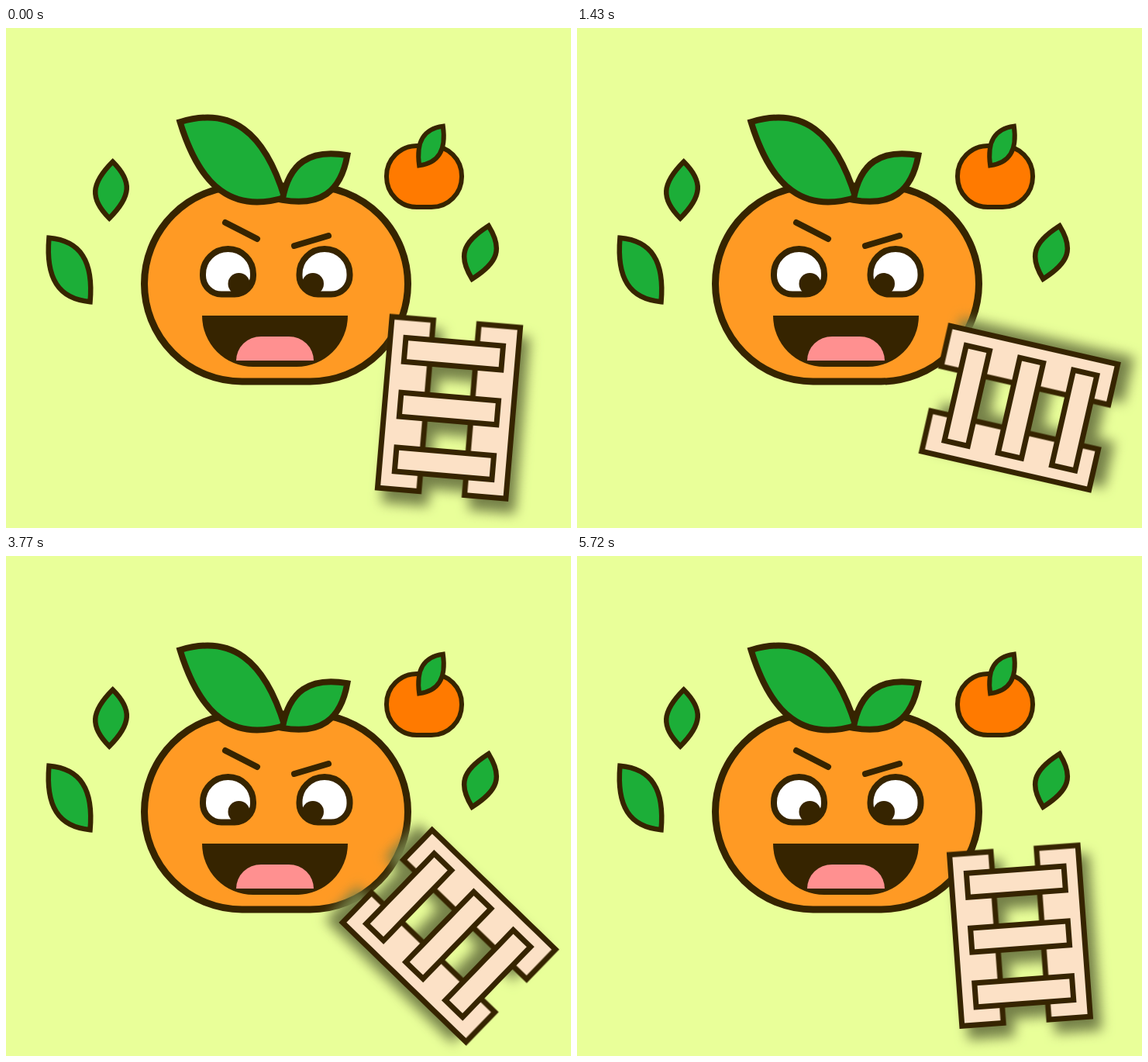
Recreate the animation shown at these times as an HTML page. Size 729x645 px, loop 5850 ms.

```html
<!DOCTYPE html>
<html lang="en">
<head>
<meta charset="utf-8">
<title>Tangerine and ladder</title>
<style>
  html, body { margin: 0; width: 100%; height: 100%; overflow: hidden; background: #e9ff99; }
  svg { position: absolute; left: 0; top: 0; overflow: visible; stroke: #362400; }
  .leaf { fill: #1cae38; }
  .brow { stroke-width: 8; stroke-linecap: round; }
  .dark { fill: #362400; stroke: none; }
  #ladder { transform-origin: 571.5px 490px; fill: #fce1c6; stroke-width: 7; }
  #ladder g { filter: drop-shadow(10px 15px 8px #758148); }
</style>
</head>
<body>
<svg width="729" height="645">
  <defs>
    <path id="eye" d="M4 36.5a32.5 32.5 0 0 1 65 0v2a24 24 0 0 1-24 24h-17a24 24 0 0 1-24-24z" fill="#fff" stroke-width="8"/>
  </defs>
  <rect x="178.5" y="204" width="340" height="252" rx="126" fill="#ff9a24" stroke-width="9"/>
  <path class="brow" d="M283 251L324 272M372 281L416 268"/>
  <use href="#eye" x="250" y="281"/>
  <use href="#eye" x="374.5" y="281"/>
  <circle class="dark" cx="300.5" cy="330" r="14"/>
  <circle class="dark" cx="396" cy="330" r="14"/>
  <path class="dark" d="M253 371H441A66 66 0 0 1 375 437H319A66 66 0 0 1 253 371Z"/>
  <path d="M297 429A32 31 0 0 1 329 398H365A32 31 0 0 1 397 429Z" fill="#ff9090" stroke="none"/>
  <rect x="491" y="152" width="97" height="79" rx="39" fill="#ff7a00" stroke-width="6"/>
  <g id="leaves" class="leaf"></g>
</svg>
<svg id="ladder" width="729" height="645"><g></g></svg>
<script>
const STEP = 130, LOOP = 5850, SPIN = 3120, PHASE = 0.0255;
const ladder = document.getElementById('ladder');

// Leaf between tips P and Q; `deg` is the direction in which one edge leaves P.
function leaf(px, py, qx, qy, deg, stroke, bulge = 0.68) {
  const len = Math.hypot(qx - px, qy - py), inset = stroke * 0.7 / len;
  const ix = (qx - px) * inset, iy = (qy - py) * inset;
  px += ix; py += iy; qx -= ix; qy -= iy;
  const r = deg * Math.PI / 180, c = Math.cos(r), s = Math.sin(r);
  const w = ((qx - px) * c + (qy - py) * s) * bulge;
  const h = ((qy - py) * c - (qx - px) * s) * bulge;
  const ax = w * c, ay = w * s, bx = -h * s, by = h * c;
  return `<path stroke-width="${stroke}" d="M${px} ${py}
    C${px + ax} ${py + ay} ${qx - bx} ${qy - by} ${qx} ${qy}
    C${qx - ax} ${qy - ay} ${px + bx} ${py + by} ${px} ${py}Z"/>`;
}

document.getElementById('leaves').innerHTML =
  leaf(220, 118, 364, 222, -17, 8) +
  leaf(445, 161, 352, 225, 100, 8) +
  leaf(138, 168, 133, 250, 45, 6.5, 0.74) +
  leaf(53, 267, 111, 357, 5, 6.5) +
  leaf(624, 251, 600, 328, 58, 6.5, 0.74) +
  leaf(566, 123, 531, 181, 82, 6);

const plank = (x, y, w, h) => `<rect x="${x}" y="${y}" width="${w}" height="${h}"/>`;
ladder.firstElementChild.innerHTML =
  [488.5, 601].map(x => plank(x, 379, 53.5, 221.5)).join('') +
  [404.5, 475.5, 546.5].map(y => plank(508.5, y, 126, 31)).join('');

// Same curve as the CSS "ease" keyword.
function ease(p) {
  let lo = 0, hi = 1, s;
  for (let i = 0; i < 24; i++) {
    s = (lo + hi) / 2;
    if (0.75 * s * (1 - s) + s ** 3 < p) lo = s; else hi = s;
  }
  return 0.3 * s * (1 - s) ** 2 + 3 * s * s * (1 - s) + s ** 3;
}

function draw() {
  const t = Math.floor(performance.now() % LOOP / STEP) * STEP;
  ladder.style.transform = `rotate(${360 * ease((t / SPIN + PHASE) % 1)}deg)`;
  requestAnimationFrame(draw);
}
draw();
</script>
</body>
</html>
```
